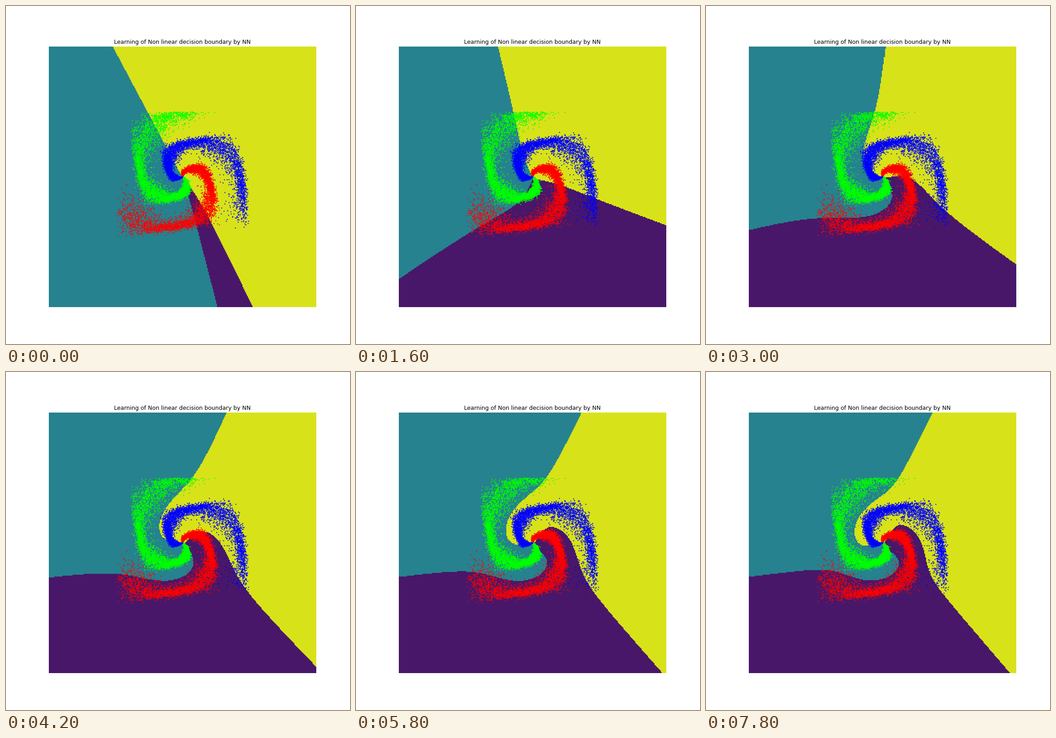
Write a matplotlib script that moves like this. It is 755 px wide and 742 px high and loops after 8 s.

```python
import numpy as np
import matplotlib.pyplot as plt
from matplotlib.animation import FuncAnimation
from matplotlib.colors import ListedColormap

W, H, DPI = 755, 742, 72
FRAMES, STEP = 40, 200
LEFT, RIGHT, TOP, BOTTOM = 94, 680, 89, 661
CELL = 2                     # side of one square of the class map, in pixels
HUB = (388, 379)             # where the three regions meet
BEND = 77                    # radius at which the borders curl
PURPLE, TEAL, YELLOW = 0, 1, 2

# Border directions in degrees clockwise from up: far from the hub and next to it.
TIMES = [0, 0.8, 1.6, 3.0, 4.2, 6.2]
TEAL_YELLOW = ([-28, -20.5, -14, 5, 23.5, 26.5], [-28, -20, -24, -58, -78, -94])
YELLOW_PURPLE = ([153.5, 116.5, 110, 125, 136, 139.4], [140, 114, 101, 80, 48, 33])
PURPLE_TEAL = ([165.5, 220, 235, 255, 262.5, 263], [163, 220, 203, 145, 142, 132])

x, y = np.meshgrid(np.arange(LEFT, RIGHT, CELL) + CELL / 2 - HUB[0],
                   np.arange(TOP, BOTTOM, CELL) + CELL / 2 - HUB[1])
radius = np.hypot(x, y)
angle = np.degrees(np.arctan2(x, -y))


def border(keys, t):
    """Angle of a border at every cell: a straight ray that curls at BEND."""
    far, near = (np.interp(t, TIMES, k) for k in keys)
    curl = 1 / (1 + (radius / BEND) ** (1.5 + 0.65 * t))
    curl += (1 - curl) * 15 / np.maximum(radius, 15)
    return far + (near - far) * curl


def regions(t):
    start = border(TEAL_YELLOW, t)
    turn = (angle - start) % 360
    return np.where(turn < border(YELLOW_PURPLE, t) - start, YELLOW,
                    np.where(turn < border(PURPLE_TEAL, t) - start, PURPLE, TEAL))


def spiral(k, n=5000, noise=0.2):
    r = np.linspace(0, 1, n)
    a = np.linspace(k, k + 2, n) * 2 * np.pi / 3
    return (r * np.sin(a + rng.normal(0, noise, n)),
            r * np.cos(a + rng.normal(0, noise, n)))


rng = np.random.default_rng(4)
fig = plt.figure(figsize=((W + 1e-6) / DPI, (H + 1e-6) / DPI), dpi=DPI,
                 facecolor="white")
ax = fig.add_axes([LEFT / W, 1 - BOTTOM / H, (RIGHT - LEFT) / W, (BOTTOM - TOP) / H])
ax.axis("off")
ax.set_title("Learning of Non linear decision boundary by NN",
             fontsize=12.5, family="DejaVu Sans")
image = ax.imshow(regions(0), extent=(-2, 2, -2, 2), aspect="auto",
                  cmap=ListedColormap(["#481769", "#26828e", "#d8e219"]),
                  vmin=0, vmax=2, interpolation="nearest")
for k, color in enumerate(["#ff0000", "#00ff00", "#0000ff"]):
    ax.scatter(*spiral(k), s=1.5, c=color)
ax.set(xlim=(-2, 2), ylim=(-2, 2))


def update(i):
    image.set_data(regions(i * STEP / 1000))
    return [image]


anim = FuncAnimation(fig, update, frames=FRAMES, interval=STEP,
                     repeat=True, repeat_delay=0)
plt.show()
```
